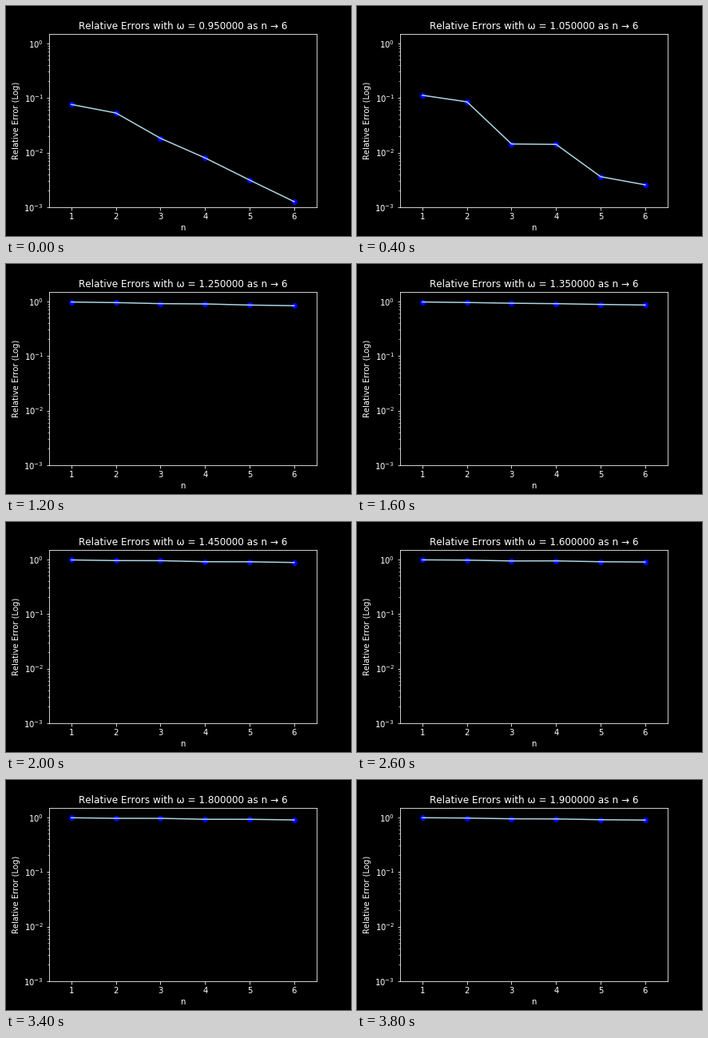
These frames come from a looping animation (432 px wide and 288 px high, 4000 ms). A matplotlib script:

```python
import numpy as np
import matplotlib.pyplot as plt
from matplotlib.animation import FuncAnimation

plt.style.use("dark_background")
plt.rcParams.update({
    "font.family": "DejaVu Sans",
    "font.size": 10,
    "text.kerning_factor": 6,
    "figure.subplot.bottom": 0.125,
    "figure.subplot.top": 0.88,
    "figure.subplot.left": 0.125,
    "figure.subplot.right": 0.9,
})

FRAMES = 20
N = np.arange(1, 7)

# log10 errors of the two converging key curves, at omega 0.95 and 1.05
SLOW = np.array([-1.12, -1.276, -1.739, -2.098, -2.503, -2.898])
FAST = np.array([-0.952, -1.072, -1.843, -1.85, -2.441, -2.59])


def smoother(t):
    t = np.clip(t, 0, 1)
    return t**3 * (t * (6 * t - 15) + 10)


def stalled(omega):
    """Nearly flat curve just below 1, with a ripple that flips with omega."""
    start = 0.033 - 0.02 * (omega - 1.25)
    slope = 0.0165 + 0.055 * (omega - 1.7)**2
    ripple = 0.011 * (-1.0)**N * np.cos(2 * np.pi * (omega - 1.45) / 0.33)
    return 1 - start - slope * (N - 1) - ripple * np.sin(np.pi * (N - 1) / 5)


def errors(omega):
    converging = SLOW + (FAST - SLOW) * min((omega - 0.95) / 0.1, 1)
    # Larger n reaches the stalled regime later
    mix = smoother((omega - 1.05) / (0.1 + 0.01 * (N - 1)))
    return 10**(converging * (1 - mix) + np.log10(stalled(omega)) * mix)


fig, ax = plt.subplots(figsize=(6, 4), dpi=72)
ax.set_yscale("log")
ax.set_xlim(0.5, 6.5)
ax.set_ylim(1e-3, 1.5)
ax.set_xlabel("n")
ax.set_ylabel("Relative Error (Log)")
title = ax.set_title("")
dots, = ax.plot(N, errors(0.95), "o", color="blue", markersize=6)
line, = ax.plot(N, errors(0.95), color="lightblue", linewidth=1.5)


def update(i):
    omega = 0.95 + 0.05 * i
    title.set_text(f"Relative Errors with ω = {omega:.6f} as n → 6")
    for artist in (dots, line):
        artist.set_ydata(errors(omega))
    return title, dots, line


anim = FuncAnimation(fig, update, frames=FRAMES, interval=200,
                     init_func=lambda: update(0), repeat=True, repeat_delay=0)
plt.show()
```
